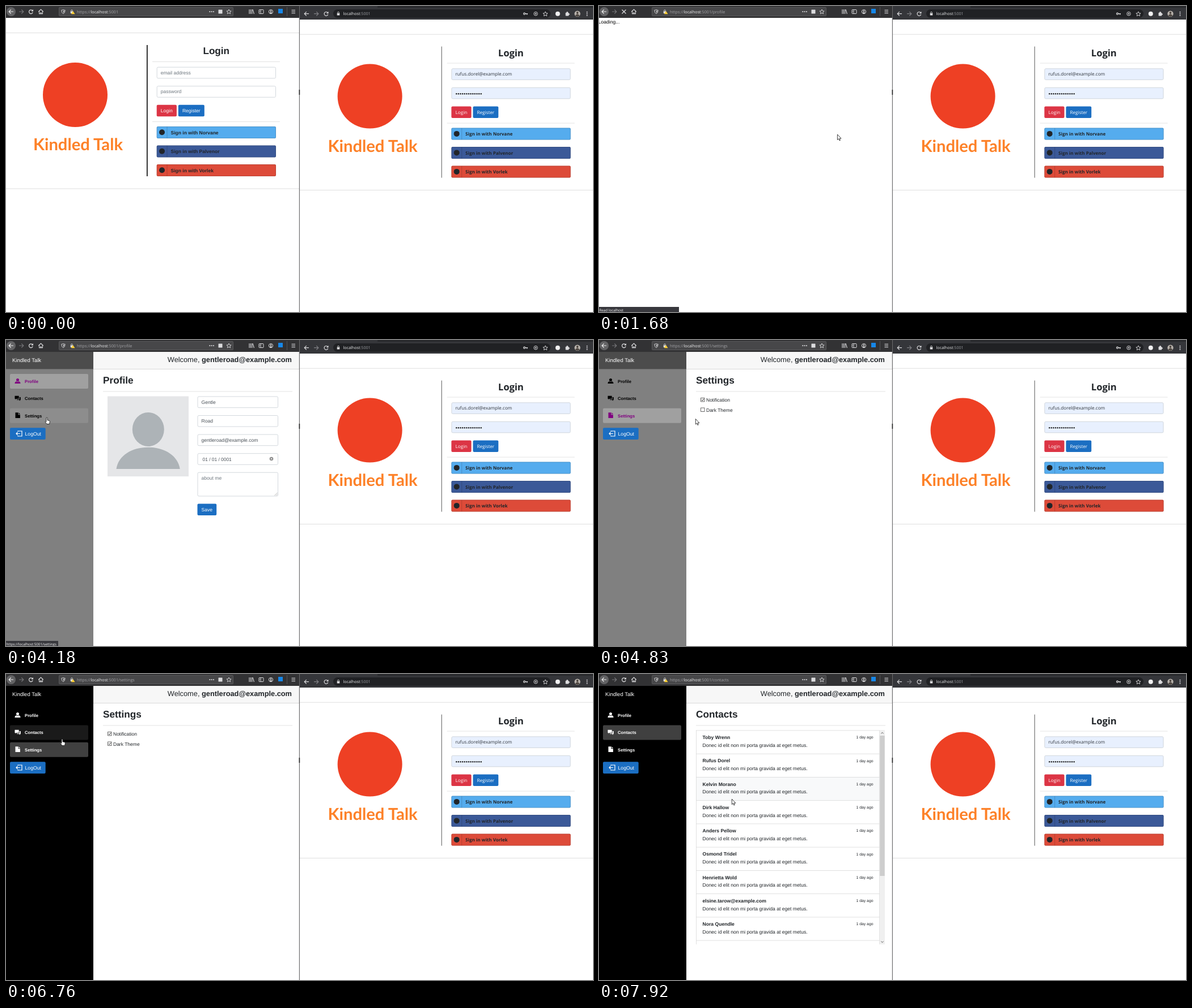
Animation, 1035 px wide and 541 px high, one loop 8 s. Source, as an HTML page:

```html
<!DOCTYPE html>
<html lang="en">
<head>
<meta charset="utf-8">
<title>Chat sign-in and theme switch</title>
<style>
html, body { margin: 0; width: 100%; height: 100%; overflow: hidden; background: #fff; }
svg { display: block; width: 1035px; height: 541px; text-rendering: geometricPrecision; }
text { white-space: pre; }
</style>
</head>
<body>
<svg id="stage" viewBox="0 0 1035 541" xmlns="http://www.w3.org/2000/svg">
  <g id="right"></g><g id="left"></g><g id="pointer"></g>
</svg>
<script>
const LOOP = 8000;
const ARIAL = "'Liberation Sans', Arial, sans-serif";
const UI = "'Open Sans', 'Noto Sans', sans-serif";
const INK = '#212529', BLUE = '#1b6ec2', PALE = '#dcdcde';
const APP = 'Kindled Talk', MAIL = 'gentleroad@example.com';
const NAV = ['Profile', 'Contacts', 'Settings'];
const PEOPLE = ['Toby Wrenn', 'Rufus Dorel', 'Kelvin Morano', 'Dirk Hallow', 'Anders Pellow',
  'Osmond Tridel', 'Henrietta Wold', 'elsine.tarow@example.com', 'Nora Quendle'];

// bursts of activity: start, end, number of picture changes
const BURSTS = [[190, 730, 8], [970, 1760, 11], [1840, 2630, 11], [2690, 3480, 11], [3560, 3720, 3],
  [4180, 4960, 11], [5060, 5280, 4], [5660, 5750, 2], [6360, 6990, 9], [7140, 7920, 11]];

// pointer keys: time, x, y
const PATH = [[190, 944, 459], [730, 421, 227], [1900, 420, 227], [2550, 290, 212], [2930, 290, 212],
  [3480, 78, 134.5], [3720, 72, 137], [4300, 72, 137], [4800, 170, 139.5], [4960, 183, 126],
  [5280, 182, 126], [6290, 182, 126], [6753, 99, 115], [6990, 85.5, 107.5], [7460, 85.5, 107.5], [7920, 234, 221]];

const box = (x, y, w, h, fill, more = '') =>
  `<rect x="${x}" y="${y}" width="${w}" height="${h}" fill="${fill}" ${more}/>`;
const dot = (x, y, r, fill, more = '') => `<circle cx="${x}" cy="${y}" r="${r}" fill="${fill}" ${more}/>`;
const line = (d, color, w = 1, more = '') =>
  `<path d="${d}" fill="none" stroke="${color}" stroke-width="${w}" ${more}/>`;
const shape = (d, fill, more = '') => `<path d="${d}" fill="${fill}" ${more}/>`;
const at = (x, y, s) => `<g transform="translate(${x} ${y})">${s}</g>`;
const text = (x, y, s, size = 8.55, fill = INK, font = ARIAL, more = '') =>
  `<text x="${x}" y="${y}" font-size="${size}" fill="${fill}" font-family="${font}" ${more}>${s}</text>`;
const BOLD = 'font-weight="700"', MID = 'text-anchor="middle"', END = 'text-anchor="end"';
const RULE = 'rgba(0,0,0,.11)';

/* ---------- toolbar icons ---------- */
const back = (x, y, c, flip = 1) =>
  at(x, y, line(`M${4 * flip} 0H${-3.5 * flip}M${-.3 * flip} -3.6L${-3.8 * flip} 0L${-.3 * flip} 3.6`, c, 1.2));
const reload = (x, y, c) => at(x, y, line('M2.6 -2A3.4 3.4 0 1 0 3.2 1.3', c, 1.2) + shape('M4 -4V-.4H.4Z', c));
const star = (x, y, c) => at(x, y,
  line('M0 -4L1.2 -1.3L4.1 -1L1.9 .9L2.6 3.8L0 2.3L-2.6 3.8L-1.9 .9L-4.1 -1L-1.2 -1.3Z', c, .9, 'stroke-linejoin="round"'));
const lock = (x, y, c) => at(x, y, box(-2.3, -.8, 4.6, 3.8, c) + line('M-1.4 -.6V-1.8A1.4 1.4 0 0 1 1.4 -1.8V-.6', c, .8));

function toolbar(path, busy) {
  const c = PALE;
  const stop = at(44, 10, line('M-3.5 -3.5L3.5 3.5M3.5 -3.5L-3.5 3.5', c, 1.3));
  return box(0, 0, 517, 21, '#323234') + dot(9, 10, 8, '#636365') + back(9, 10, '#f0f0f0') + back(27, 10, '#77777a', -1) +
    (busy ? stop : reload(44, 10, c)) +
    at(61.5, 10, line('M-4.2 0L0 -4L4.2 0M-2.9 -.6V3.6H2.9V-.6', c, 1.1) + box(-.8, 1, 1.6, 2.6, c)) +
    box(93.5, 2.5, 307, 15, '#474749', 'stroke="#626264" stroke-width=".8" rx="1"') +
    at(101, 10, line('M0 -3.6Q1.7 -2.6 3.2 -2.6Q3.2 2 0 3.8Q-3.2 2 -3.2 -2.6Q-1.7 -2.6 0 -3.6Z', c, .9) + shape('M0 -2V2.4Q1.7 .6 1.8 -1.5Z', c)) +
    lock(116, 10, c) + shape('M118 9L121.6 14.2H114.8Z', '#ffcf33') +
    text(125, 13, `https://<tspan fill="#f4f4f5">localhost</tspan>:5001${path}`, 7.2, '#a4a4a7', UI) +
    [-3.3, 0, 3.3].map(d => dot(362.6 + d, 10, 1.1, c)).join('') +
    box(374.5, 6.5, 7, 7, c, 'rx=".5"') + star(393, 10, c) +
    line('M429 6V14M431.4 6V14M433.8 6V14M435 6.2L437.4 14', c, 1.1) +
    box(446, 6.5, 8, 7, 'none', `stroke="${c}" rx="1"`) + line('M449.2 6.5V13.5M447 8.8H448.6M447 10.7H448.6', c, .8) +
    dot(467, 10, 3.6, 'none', `stroke="${c}"`) + dot(467, 9, 1.3, c) + shape('M464.8 12.2Q467 9.8 469.2 12.2Q467 14 464.8 12.2Z', c) +
    box(480, 5, 8, 8, '#1687e8') + line('M495.5 2V18', '#5b5b5d', .8) +
    line('M503.5 7.2H510M503.5 10H510M503.5 12.8H510', c, 1.1);
}

function chromeBar() {
  const c = PALE;
  return box(518, 0, 517, 24, '#35363a') + box(655, 0, 380, 3, '#28292c') + box(577, 6, 383, 15, '#202124', 'rx="7.5"') +
    back(530, 13.7, c) + back(547, 13.7, '#808185', -1) + reload(564.5, 13.7, c) + lock(586, 13.5, c) +
    text(594.5, 16.3, 'localhost<tspan fill="#9a9ca1">:5001</tspan>', 7.15, '#eeeff1', UI) +
    dot(914, 13.7, 1.5, 'none', `stroke="${c}" stroke-width="1.2"`) + line('M915.6 13.7H920M918.6 13.7V15.6', c, 1.2) +
    dot(934, 13.7, 3.3, 'none', `stroke="${c}" stroke-width=".9"`) + line('M932.2 13.7H935.8M934 11.9V15.5', c, .9) +
    star(951, 13.9, c) + dot(972.8, 13.7, 4, '#f1f1f2') +
    at(990, 14, box(-3.4, -2.2, 5.6, 5.6, c, 'rx=".6"') + dot(-.4, -2.6, 1.3, c) + dot(2.6, .5, 1.3, c)) +
    dot(1007.5, 13.7, 5.2, '#b9b3ad') + dot(1007.5, 12, 1.9, '#4b443f') + shape('M1003.6 17Q1007.5 11.7 1011.4 17Q1007.5 20.6 1003.6 17Z', '#4b443f') +
    [-3, 0, 3].map(d => dot(1024.5, 13.7 + d, 1, c)).join('');
}

/* ---------- login page ---------- */
function field(x, y, w, h, label, color = '#495057', bg = '#fff', font = ARIAL, size = 8.55) {
  return box(x + .5, y + .5, w - 1, h - 1, bg, 'stroke="#ced4da" stroke-width=".9" rx="2"') +
    text(x + 7, y + 13.2, label, size, color, font);
}
function button(x, y, w, label, bg, font = ARIAL, size = 8.55) {
  return box(x, y, w, 20.5, bg, 'rx="2"') + text(x + w / 2, y + 13.3, label, size, '#fff', font, MID);
}
function login(filled, hot) {
  const font = filled ? UI : ARIAL, size = filled ? 8.15 : 8.55;
  const bg = filled ? '#e8f0fe' : '#fff';
  const social = [['Norvane', hot ? '#2795e9' : '#55acee'], ['Palvenor', '#3b5998'], ['Vorlek', '#dd4b39']];
  let s = dot(122, 157, 57, '#ee4024') +
    text(127, 255, APP, 29.2, '#fd8128', 'Lato, sans-serif', BOLD + ' ' + MID) +
    box(248, 69, filled ? 1 : 1.7, 232, filled ? '#555' : '#111') +
    text(370.7, filled ? 86 : 85.3, 'Login', filled ? 16.6 : 17.1, INK, font, BOLD + ' ' + MID) +
    box(258, 98, 225, 1, RULE) + box(258, 204, 225, 1, RULE) +
    field(265.7, 107.7, 210.3, 20.6, filled ? 'rufus.dorel@example.com' : 'email address', filled ? '#30363c' : '#6c757d', bg, font, size) +
    field(265.7, 141.2, 210.3, 20.6, filled ? '' : 'password', '#6c757d', bg, font, size) +
    button(265.7, 174.8, 35.2, 'Login', '#dc3545', font, size) +
    button(303.8, 174.8, filled ? 44.8 : 46, 'Register', BLUE, font, size);
  if (filled) for (let i = 0; i < 13; i++) s += dot(274.6 + i * 3.62, 152.7, 1.2, '#222');
  social.forEach(([name, color], i) => {
    const y = 213 + i * 33.5;
    s += box(265.7, y, 210.3, 21, color, 'rx="2"') +
      box(266.1, y + .4, 209.5, 20.2, 'none', 'stroke="rgba(0,0,0,.2)" stroke-width=".8" rx="1.8"') +
      line(`M284 ${y + .4}V${y + 20.6}`, 'rgba(0,0,0,.2)', .8) + dot(275, y + 10.3, 5, INK) +
      text(290.5, y + 13.5, 'Sign in with ' + name, filled ? 8 : 8.5, INK, font, BOLD);
  });
  return s;
}

/* ---------- signed-in pages ---------- */
const icons = [
  c => dot(0, -2, 2.5, c) + shape('M-5 4.4Q-5 1 -1.6 .8L0 1.6L1.6 .8Q5 1 5 4.4Z', c),
  c => shape('M-5 -4.2H2.2V1H-2.6L-4 2.6V1H-5Z', c) + shape('M3.2 -2H5.3V3.2H4.4V4.8L2.6 3.2H-1.4V2H3.2Z', c),
  c => shape('M-4 -5H1V-1H4.4V4.8H-4Z', c) + shape('M2 -5L4.6 -2H2Z', c)
];
const navTop = i => 60 + i * 30.4;

function sidebar(active, hover, dark) {
  const base = dark ? '#fff' : '#000';
  let s = box(0, 21, 154, 520, dark ? '#000' : '#808080') + box(0, 21, 154, 30.4, dark ? '#000' : '#4c4c4c') +
    text(11, 39.3, APP, 9.5, '#fff');
  NAV.forEach((name, i) => {
    const y = navTop(i), c = i === active && !dark ? '#800080' : base;
    if (i === hover || i === active)
      s += box(7, y, 138, 26, '#fff', `fill-opacity="${i === hover ? .1 : .25}" rx="2"`);
    s += at(20.5, y + 12.5, icons[i](c)) + text(33, y + 15.7, name, 7.7, c, ARIAL, BOLD);
  });
  return s + box(7, 155.3, 62.7, 20.7, BLUE, 'rx="2"') +
    line('M21 162V161H28V170H21V169M18 165.5H25M20.5 163L18 165.5L20.5 168', '#fff', 1.2) + text(33.5, 169, 'LogOut', 8.7, '#fff');
}
const heading = name => text(171, 77.3, name, 17.2, INK, ARIAL, BOLD) + box(171, 90.5, 334, 1, RULE);

function profile() {
  const x = 337.5, w = 142.5;
  return heading('Profile') + box(179, 99.5, 143, 141.7, '#e5e6e8') +
    `<ellipse cx="250.8" cy="158" rx="28" ry="30" fill="#adb3b7"/>` +
    shape('M194.5 228C198 204 222 189.7 250.5 189.7S303 204 306.7 228Z', '#adb3b7') +
    field(x, 99.5, w, 20.6, 'Gentle') + field(x, 133, w, 20.6, 'Road') + field(x, 166.6, w, 20.6, MAIL) +
    field(x, 200.2, w, 20.6, '') + text(346.5, 213.5, '01 / 01 / 0001', 8.4, '#495057') +
    dot(468, 210, 3.3, '#8d8d8d') + line('M466.7 208.7L469.3 211.3M469.3 208.7L466.7 211.3', '#fff', .8) +
    field(x, 233.7, w, 42.8, 'about me', '#6c757d') + line('M473.5 275L478.5 270M476.3 275L478.5 272.8', '#999', .7) +
    button(337.5, 289.5, 33.7, 'Save', BLUE);
}
function settings(darkOn) {
  const row = (y, label, on) => box(179.6, y, 6.4, 6.4, '#fff', 'stroke="#444" stroke-width=".8"') +
    (on ? line(`M180.8 ${y + 3.2}L182.4 ${y + 4.9}L185 ${y + 1.5}`, '#222', 1) : '') + text(189, y + 6.5, label, 8.5);
  return heading('Settings') + row(102.5, 'Notification', true) + row(120, 'Dark Theme', darkOn);
}
function spinner(turn) {
  let s = '';
  for (let i = 0; i < 6; i++) {
    const a = (turn - 28 + i * 37) * Math.PI / 180;
    s += dot(333.5 + 19 * Math.cos(a), 145.5 + 19 * Math.sin(a), 1.9 + 1.2 * (1 - i / 5) ** 1.3, '#2c2c2c');
  }
  return s;
}
function contacts(t, p) {
  const loaded = t >= 7670;
  let s = heading('Contacts');
  if (!loaded) s += box(171, 99, 324, 379, '#d3d3d3') + spinner((t - 7452) * .3);
  else {
    PEOPLE.forEach((name, i) => {
      const y = 99.5 + i * 41.25;
      if (inside(p, 171, y, 324, 41.25)) s += box(171, y, 324, 41.25, '#f8f9fa');
      s += box(171, y, 324, .8, '#d9d9d9') + text(182.5, y + 15.6, name, 8.6, INK, ARIAL, BOLD) +
        text(483.5, y + 14.8, '1 day ago', 6.85, INK, ARIAL, END) +
        text(182.5, y + 29.4, 'Donec id elit non mi porta gravida at eget metus.', 8.62);
    });
    s += box(171, 470.7, 324, .8, '#d9d9d9') + box(171, 99.5, .8, 378.5, '#d9d9d9') + box(494.3, 99.5, .8, 378.5, '#d9d9d9');
  }
  return s + box(495, 99, 9, 379, '#f0f0f0') + box(495.3, 109, 8.4, loaded ? 248 : 275, '#cdcdcd') +
    line('M497.4 105.4L499.5 103.3L501.6 105.4M497.4 472.6L499.5 474.7L501.6 472.6', '#505050', 1);
}
const status = (s, w) => box(0, 532, w, 9, '#38383d') + text(.5, 540, s, 6.25, '#fff', UI);

/* ---------- time ---------- */
function stepped(t) {
  let q = 0;
  for (const [a, b, n] of BURSTS) {
    if (t < a) break;
    const gap = (b - a) / (n - 1);
    q = Math.min(b, a + Math.floor((t - a + 12) / gap) * gap);
  }
  return q;
}
function pointerAt(t) {
  if (t < PATH[0][0]) return null;
  let i = 0;
  while (i < PATH.length - 2 && t >= PATH[i + 1][0]) i++;
  const [t0, x0, y0] = PATH[i], [t1, x1, y1] = PATH[i + 1];
  const u = Math.min(1, (t - t0) / (t1 - t0)), e = u * u * (3 - 2 * u);
  return { x: x0 + (x1 - x0) * e, y: y0 + (y1 - y0) * e };
}
const inside = (p, x, y, w, h) => p.x >= x && p.x <= x + w && p.y >= y && p.y <= y + h;

function draw(t) {
  const p = pointerAt(t), spot = p || { x: -99, y: -99 };
  const signedIn = t >= 2060;
  const page = t < 1120 ? -1 : t < 4250 ? 0 : t < 7210 ? 2 : 1;
  const dark = t >= 5655;
  const hover = signedIn ? NAV.findIndex((_, i) => inside(spot, 7, navTop(i), 138, 26.5)) : -1;
  const hot = page < 0 && inside(spot, 266, 213, 210, 21);
  const path = t < 1420 ? '' : '/' + NAV[page].toLowerCase();
  let s = box(0, 21, 517, 520, '#fff');

  if (page < 0) s += box(0, 47, 517, 1, '#dfdfdf') + box(0, 322.5, 517, 1, '#dfdfdf') + login(false, hot);
  else if (!signedIn) { if (t >= 1500) s += text(-1.2, 31, 'Loading...', 8.55, '#000'); }
  else {
    s += box(154, 21, 363, 30, '#f7f7f7') + box(154, 51, 363, .9, '#d6d5d5') + sidebar(page, hover, dark);
    if (t >= 2685) {
      s += text(504, 38.7, `Welcome, <tspan font-weight="700">${MAIL}</tspan>`, 12.8, INK, ARIAL, END);
      s += page === 0 ? profile() : page === 2 ? settings(t >= 5130) : contacts(t, spot);
    }
  }
  s += toolbar(path, t >= 965 && t < 2060);
  if (t >= 965 && t < 1500) s += status('Waiting for localhost…', 141);
  else if (t >= 1500 && t < 1900) s += status('Read localhost', 141);
  else if (hover >= 0 && ((t >= 3635 && t < 5000) || t >= 7135))
    s += status('https://localhost:5001/' + NAV[hover].toLowerCase(), 92);
  s += box(516, 21, 1, 520, 'rgba(0,0,0,.1)') + box(517, 0, 1, 541, '#6c6c6e') + box(516.6, 148, 1.6, 9, '#222');
  left.innerHTML = s;

  const hand = hot || hover >= 0;
  const edge = 'stroke="#111" stroke-width=".8" stroke-linejoin="round"';
  pointer.innerHTML = !p ? '' : at(p.x, p.y, hand
    ? shape('M-1 1a1 1 0 0 1 2 0V4.8l3.2.7q1.3.4 1.1 1.8l-.7 4.2H0L-3 7.6q.4-1.5 2 0Z', '#fff', edge)
    : shape('M.3 0V9.6L2.4 7.7L3.9 11L5.3 10.4L3.9 7.2H6.9Z', '#fff', edge));
}

const left = document.getElementById('left'), pointer = document.getElementById('pointer');
document.getElementById('right').innerHTML = box(518, 0, 517, 541, '#fff') + box(518, 49.7, 517, 1, '#dfdfdf') +
  box(518, 325, 517, 1, '#dfdfdf') + at(519.6, 2.6, login(true, false)) + chromeBar();

const start = performance.now();
let last = -1;
function tick() {
  const q = stepped((performance.now() - start) % LOOP);
  if (q !== last) draw(last = q);
  requestAnimationFrame(tick);
}
tick();
</script>
</body>
</html>
```
